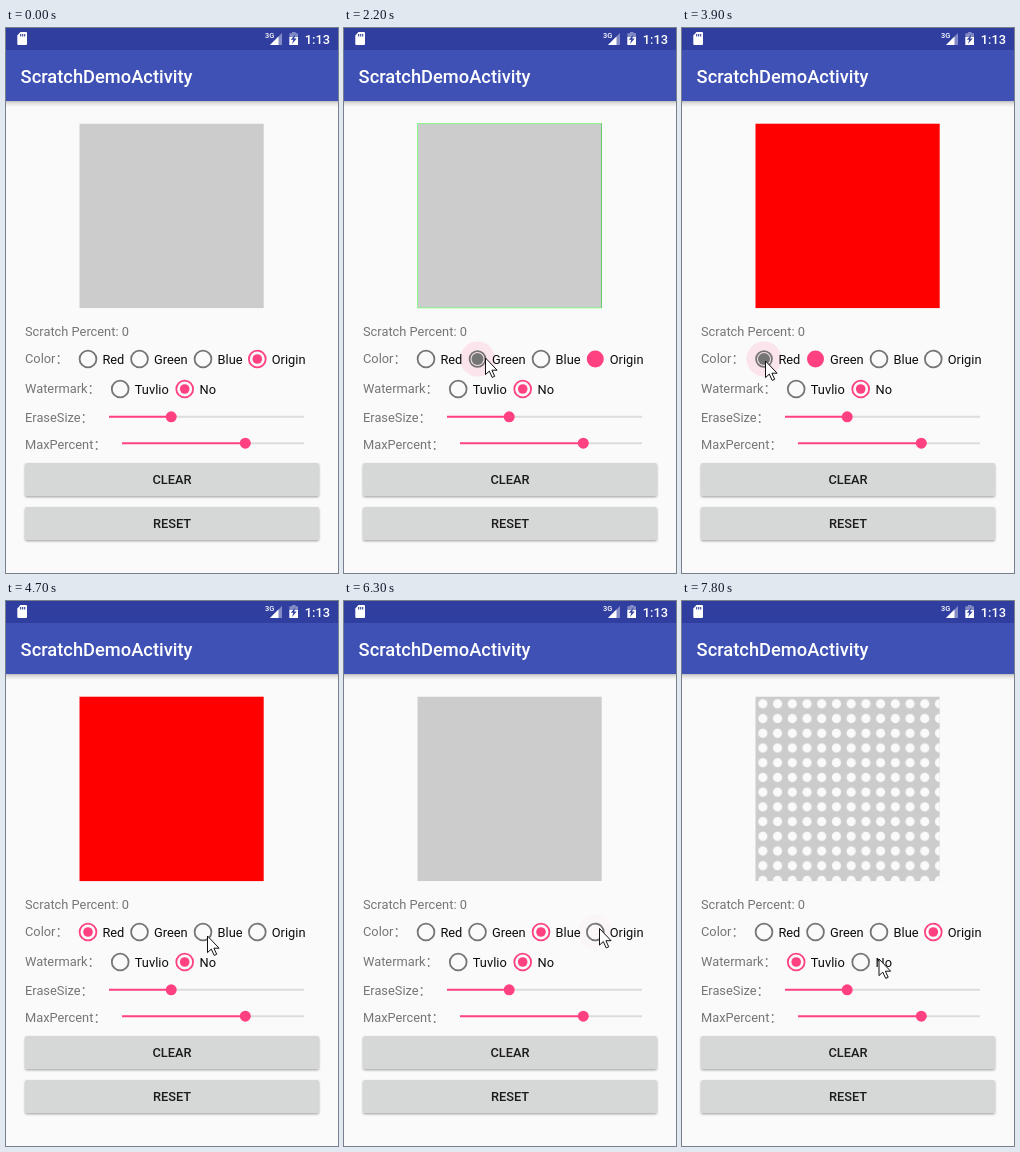
Write an HTML page that moves like this. It is 332 px wide and 545 px high and loops after 8 s.

```html
<!DOCTYPE html>
<html lang="zh-CN">
<head>
<meta charset="utf-8">
<title>Scratch demo</title>
<style>
html, body { margin: 0; width: 100%; height: 100%; overflow: hidden; background: #fafafa; }
svg { display: block; width: 332px; height: 545px; }
text { font: 12.83px Roboto, "Noto Sans CJK SC", sans-serif; white-space: pre; }
.label { fill: #757575; }
.option { fill: #0c0c0c; }
.medium { font-weight: 500; }
</style>
</head>
<body>
<svg id="stage" viewBox="0 0 332 545" xmlns="http://www.w3.org/2000/svg">
  <defs>
    <linearGradient id="shade" x2="0" y2="1">
      <stop offset="0" stop-color="#000" stop-opacity=".24"/>
      <stop offset=".4" stop-color="#000" stop-opacity=".1"/>
      <stop offset="1" stop-color="#000" stop-opacity="0"/>
    </linearGradient>
    <pattern id="marks" x="73.5" y="95.5" width="14.72" height="14.72" patternUnits="userSpaceOnUse">
      <circle cx="7.36" cy="7.36" r="4.6" fill="#fafafa"/>
    </pattern>
    <filter id="drop" x="-5%" y="-20%" width="110%" height="150%">
      <feDropShadow dx="0" dy="1.2" stdDeviation="0.9" flood-color="#000" flood-opacity=".35"/>
    </filter>
  </defs>

  <rect width="332" height="545" fill="#fafafa"/>
  <rect y="73" width="332" height="6" fill="url(#shade)"/>
  <rect width="332" height="73" fill="#3f51b5"/>
  <rect width="332" height="22" fill="#303f9f"/>

  <path d="M14.5 4H20q1 0 1 1V16q0 1-1 1H12.3q-1 0-1-1V7.4Z" fill="#fff"/>
  <path d="M14.7 6v2.4M16.7 6v2.4M18.7 6v2.4" stroke="#303f9f" stroke-width="1.1"/>
  <text class="medium" x="259" y="9.6" fill="#fff" style="font-size:7.4px">3G</text>
  <path d="M276 5V17H264Z" fill="#fff" opacity=".4"/>
  <path d="M272.5 8.5V17H264Z" fill="#fff"/>
  <path d="M286 4h3.6v1.3H292V17H283.4V5.3H286Z" fill="#fff" opacity=".4"/>
  <path d="M283.4 9H292V17H283.4Z" fill="#fff"/>
  <path d="M289.4 6.5L284.8 11.8H287.3L286 16L290.7 10.6H288.2Z" fill="#303f9f"/>
  <text class="medium" x="298.7" y="16" fill="#fff">1:13</text>
  <text class="medium" x="14.6" y="55" fill="#fff" style="font-size:18.3px">ScratchDemoActivity</text>

  <rect id="panel" x="73.5" y="95.7" width="184.2" height="184.4"/>
  <rect id="watermark" x="73.5" y="95.7" width="184.2" height="184.4" fill="url(#marks)"/>
  <g id="fringe" fill="none">
    <path d="M257.5 95.5H73.5V279.8H257.5" stroke="#8cf58c"/>
    <path d="M257.5 95V280" stroke="#66cc66"/>
  </g>

  <g id="controls"></g>
  <circle id="ripple" r="17.5" fill="#ff4081"/>
  <g id="radios"></g>
  <path id="cursor" d="M0 0V16.6L3.8 13.1L6.7 19.4L9.2 18.3L6.4 12.2H11.6Z" fill="#fff" stroke="#111" stroke-width="1"/>
</svg>

<script>
const LOOP = 8000, PINK = '#ff4081', GRAY = '#757575';
const $ = id => document.getElementById(id);

const label = (x, y, s) => `<text class="label" x="${x}" y="${y}">${s}</text>`;

const slider = (y, from, to) =>
  `<path d="M${to} ${y}H298" stroke="#dcdcdc" stroke-width="1.9"/>
   <path d="M${from} ${y}H${to}" stroke="${PINK}" stroke-width="1.9"/>
   <circle cx="${to}" cy="${y}" r="5.5" fill="${PINK}"/>`;

const button = (y, s) =>
  `<rect x="19" y="${y}" width="294" height="33" rx="1.8" fill="#d6d7d7" filter="url(#drop)"/>
   <text class="medium" x="166" y="${y + 21.2}" text-anchor="middle" fill="#1c1c1c">${s}</text>`;

$('controls').innerHTML =
  label(19, 308, 'Scratch Percent: 0') + label(19, 335, 'Color：') +
  label(19, 364.8, 'Watermark：') + label(19, 394, 'EraseSize：') + label(19, 421, 'MaxPercent：') +
  slider(388.8, 103, 165.2) + slider(415.2, 116, 239.3) +
  button(435, 'CLEAR') + button(479, 'RESET');

// name: [centre x, centre y, text x, text]
const options = {
  red: [82, 331, 96.4, 'Red'],
  green: [133.5, 331, 148, 'Green'],
  blue: [197, 331, 211.6, 'Blue'],
  origin: [251.3, 331, 265.8, 'Origin'],
  brand: [114.2, 361, 128.8, 'Tuvlio'],
  none: [178.7, 361, 193.5, 'No']
};

const radios = {};
for (const [name, [x, y, tx, s]] of Object.entries(options)) {
  $('radios').insertAdjacentHTML('beforeend',
    `<g><circle cx="${x}" cy="${y}" fill="none" stroke-width="1.8"/>
     <circle cx="${x}" cy="${y}"/>
     <text class="option" x="${tx}" y="${y + 5}">${s}</text></g>`);
  const [ring, dot] = $('radios').lastElementChild.children;
  radios[name] = { ring, dot };
}

function setRadio(name, color, dotRadius, ringRadius = 8.4) {
  const { ring, dot } = radios[name];
  ring.setAttribute('stroke', color);
  ring.setAttribute('r', ringRadius);
  dot.setAttribute('fill', color);
  dot.setAttribute('r', dotRadius);
}

// Steps of a selection: old radio and new radio as [colour, dot, ring], ripple opacity
const off = [GRAY, 0], on = [PINK, 4.8];
const press = [
  [on, off, 0.02],
  [[PINK, 6.4], [GRAY, 7.6, 7.6], 0.12],
  [[PINK, 7.6, 7.6], [GRAY, 6, 7.9], 0.12],
  [off, on, 0.06],
  [off, on, 0]
];

// [start, first step, old, new]
const taps = [
  [2100, 1, 'origin', 'green'],
  [3900, 2, 'green', 'red'],
  [5300, 1, 'red', 'blue'],
  [6300, 0, 'blue', 'origin'],
  [7300, 1, 'none', 'brand']
];

const fills = [[0, '#ccc'], [3900, '#f00'], [5300, '#00f'], [6300, '#ccc']];

// Pointer path: [time, x, y]
const path = [
  [0, 277, 278], [100, 277, 278], [800, 175.5, 200], [900, 174.5, 194], [1000, 175, 192],
  [1300, 181.5, 190.5], [1400, 181.5, 190.5], [1500, 192, 205], [1900, 141.5, 330],
  [2400, 141.5, 330], [3000, 83.5, 333], [4100, 83.5, 333], [4500, 170, 339], [4700, 201.5, 335],
  [5600, 201.5, 335], [5900, 255.5, 327.5], [6500, 255.5, 327.5], [6900, 119, 357],
  [7500, 119, 357], [7800, 197, 358]
];

function pointer(t) {
  const i = path.findIndex(p => p[0] > t);
  if (i < 0) return path[path.length - 1].slice(1);
  const [t0, x0, y0] = path[i - 1], [t1, x1, y1] = path[i];
  const u = (t - t0) / (t1 - t0), k = u * (2 - u);
  return [x0 + (x1 - x0) * k, y0 + (y1 - y0) * k];
}

const show = (id, visible) => $(id).setAttribute('visibility', visible ? 'visible' : 'hidden');

function draw(time) {
  const t = Math.floor((time % LOOP) / 100) * 100;

  for (const name in radios) setRadio(name, ...off);
  setRadio('origin', ...on);
  setRadio('none', ...on);
  $('ripple').setAttribute('opacity', 0);
  for (const [start, first, from, to] of taps) {
    if (t < start) break;
    const step = Math.min(4, first + (t - start) / 100);
    const [before, after, glow] = press[step];
    setRadio(from, ...before);
    setRadio(to, ...after);
    $('ripple').setAttribute('cx', options[to][0]);
    $('ripple').setAttribute('cy', options[to][1]);
    $('ripple').setAttribute('opacity', glow);
  }

  $('panel').setAttribute('fill', fills.filter(f => f[0] <= t).pop()[1]);
  show('fringe', t >= 2100 && t < 3900);
  show('watermark', t >= 7300);
  show('cursor', t >= 100);
  const [x, y] = pointer(t);
  $('cursor').setAttribute('transform', `translate(${x} ${y})`);
}

const begin = performance.now();
function tick() {
  draw(performance.now() - begin);
  requestAnimationFrame(tick);
}
tick();
</script>
</body>
</html>
```
